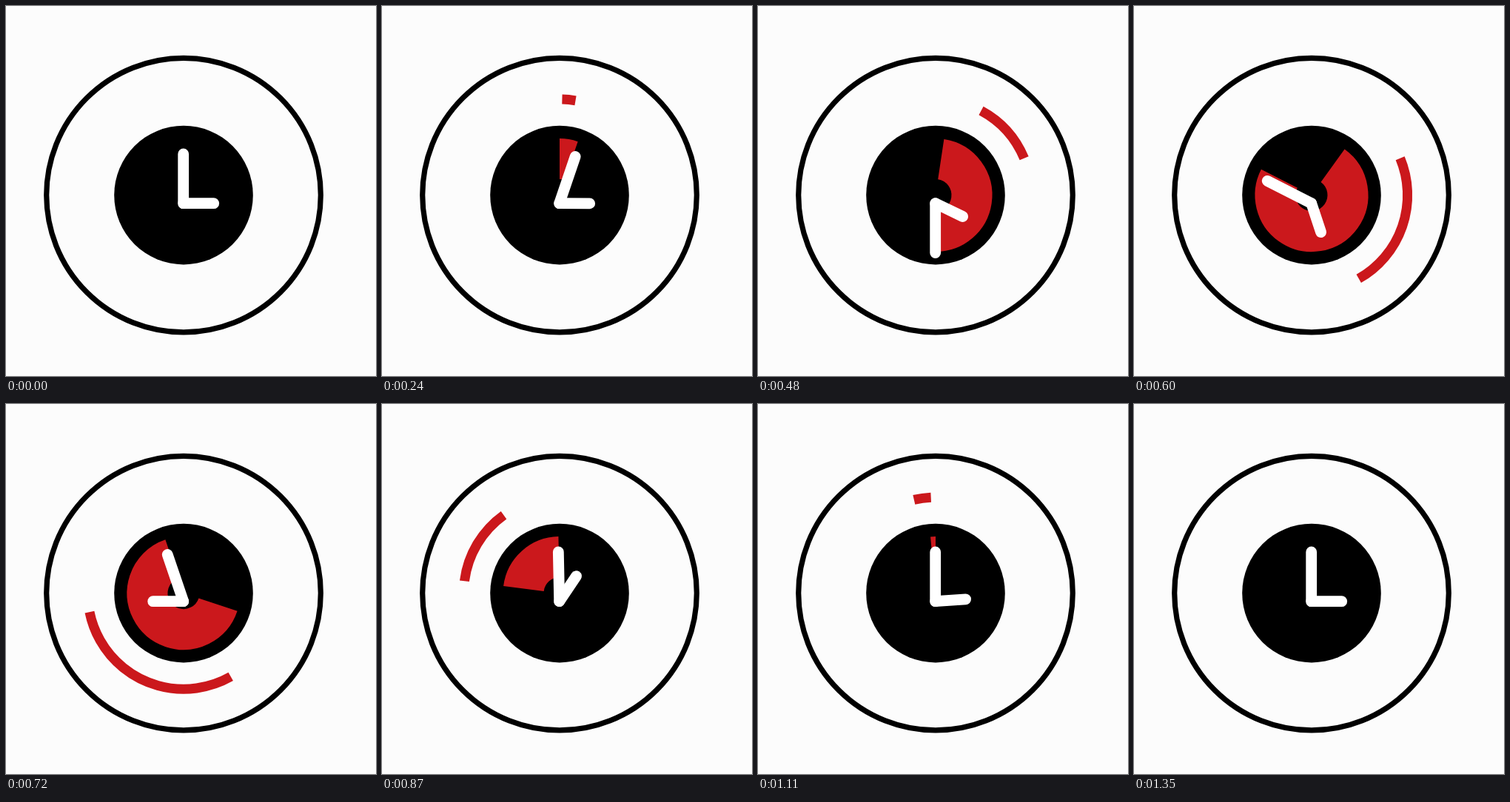
Animation of 500 by 500 pixels, one loop 1.86 s. Source, as an HTML page with a canvas:

```html
<!DOCTYPE html>
<html lang="en">
<head>
<meta charset="utf-8">
<title>Clock</title>
<style>
  html, body { margin: 0; width: 100%; height: 100%; overflow: hidden; background: #fcfcfc; }
  canvas { display: block; }
</style>
</head>
<body>
<canvas id="stage" width="500" height="500"></canvas>
<script>
const ctx = document.getElementById('stage').getContext('2d');
const LOOP = 1860, STEP = 30, TURN = Math.PI * 2;
const CX = 240, CY = 255.6;
const PIVOT_X = 239.7, PIVOT_Y = 266.7;
const RED = '#cb181c';

// Eased progress along cubic-bezier(.7, 0, .3, 1), solved by bisection.
function ease(x) {
  if (x <= 0) return 0;
  if (x >= 1) return 1;
  let lo = 0, hi = 1;
  for (let i = 0; i < 30; i++) {
    const s = (lo + hi) / 2, r = 1 - s;
    if (2.1 * s * r * r + 0.9 * s * s * r + s * s * s < x) lo = s; else hi = s;
  }
  return lo * lo * (3 - 2 * lo);
}

const turn = (t, start, end) => TURN * ease((t - start) / (end - start));

// Angles run clockwise from twelve o'clock.
function arc(radius, width, color, from = 0, to = TURN) {
  if (to - from < 1e-4) return;
  ctx.beginPath();
  ctx.arc(CX, CY, radius, from - TURN / 4, to - TURN / 4);
  ctx.lineWidth = width;
  ctx.lineCap = 'butt';
  ctx.strokeStyle = color;
  ctx.stroke();
}

function hand(length, angle) {
  ctx.beginPath();
  ctx.moveTo(PIVOT_X, PIVOT_Y);
  ctx.lineTo(PIVOT_X + length * Math.sin(angle), PIVOT_Y - length * Math.cos(angle));
  ctx.lineWidth = 14.8;
  ctx.lineCap = 'round';
  ctx.strokeStyle = '#fff';
  ctx.stroke();
}

function draw(t) {
  const minute = turn(t, 30, 930);
  ctx.fillStyle = '#fcfcfc';
  ctx.fillRect(0, 0, 500, 500);
  arc(185.3, 7.2, '#000');
  ctx.beginPath();
  ctx.arc(CX, CY, 93.8, 0, TURN);
  ctx.fillStyle = '#000';
  ctx.fill();
  arc(129.6, 13, RED, turn(t, 150, 1350), turn(t, 30, 1230));
  arc(49, 55, RED, turn(t, 330, 1230), minute);
  hand(66.8, minute);
  hand(41, TURN / 4 + turn(t, 210, 1230));
}

function tick() {
  const t = performance.now() % LOOP;
  draw(Math.floor(t / STEP) * STEP);
  requestAnimationFrame(tick);
}
tick();
</script>
</body>
</html>
```
